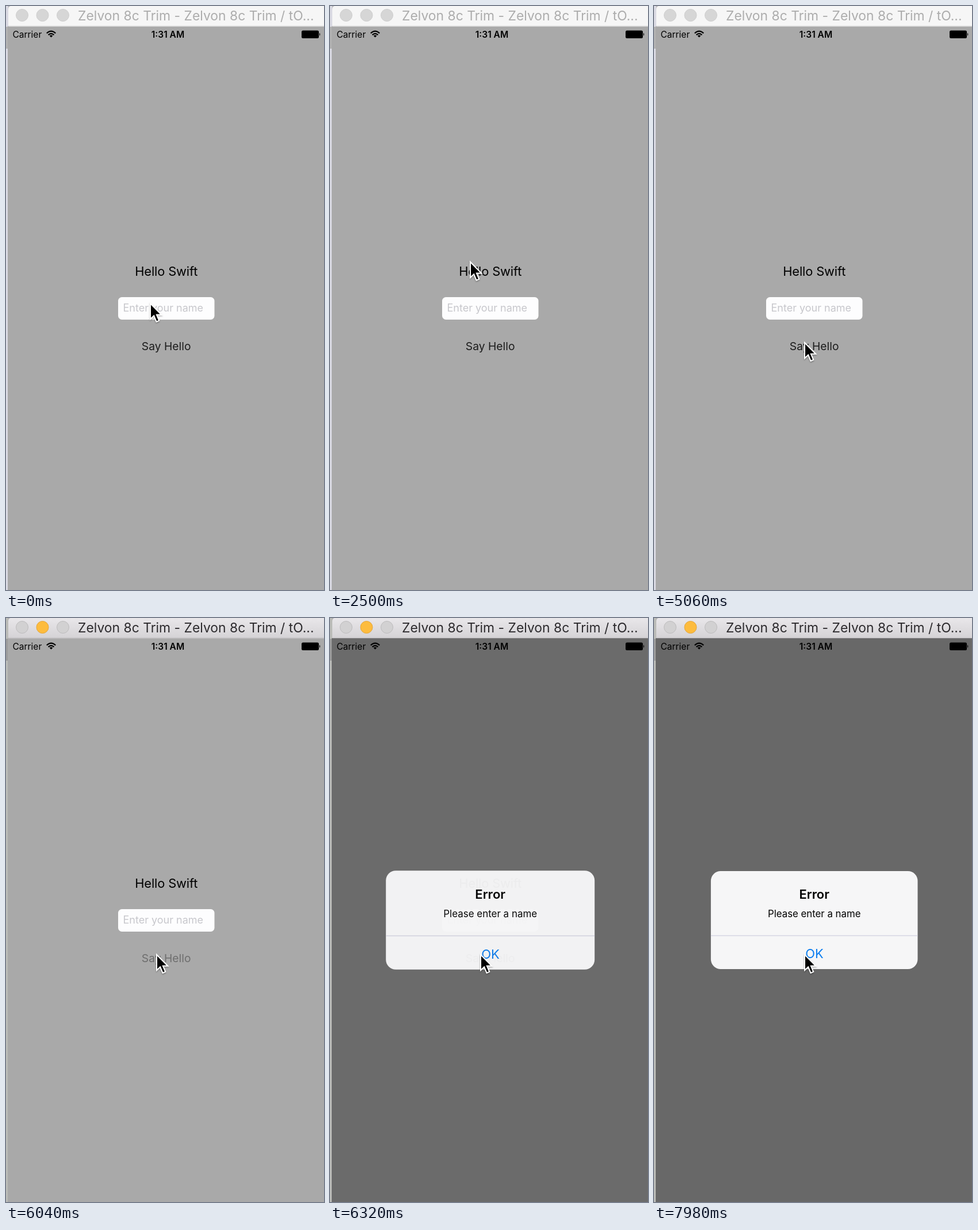
These frames come from a looping animation (553x1013 px, 8 s). An HTML page:

```html
<!DOCTYPE html>
<html lang="en">
<head>
<meta charset="utf-8">
<title>Alert demo</title>
<style>
  html, body { margin: 0; width: 100%; height: 100%; overflow: hidden; background: #aaa; }
  svg { display: block; width: 100vw; height: 100vh; }
  text { font-family: Inter, Roboto, sans-serif; white-space: pre; }
  .mid { text-anchor: middle; }
</style>
</head>
<body>
<svg viewBox="0 0 553 1013" preserveAspectRatio="none">
  <defs>
    <linearGradient id="barFill" x2="0" y2="1">
      <stop offset="0" stop-color="#e9e7ea"/>
      <stop offset="1" stop-color="#d4d2d5"/>
    </linearGradient>
    <filter id="shade" x="-50%" y="-50%" width="200%" height="200%">
      <feDropShadow dx="0" dy="1.5" stdDeviation="1.2" flood-opacity=".35"/>
    </filter>
  </defs>

  <!-- desktop edge and window -->
  <rect id="edge" width="4" height="1013"/>
  <rect id="edgeTop" y="36" width="4" height="38"/>
  <rect x="3" y="35" width="550" height="978" fill="#a9a9a9"/>
  <path id="bar" d="M4 35.500V6Q4 0 8 0H553V35.500Z"/>
  <rect id="barLine" x="4" y="34.500" width="549" height="1"/>
  <g id="lights" stroke-width="1">
    <circle cx="28" cy="16" r="10.500"/>
    <circle cx="63.500" cy="16" r="10.500"/>
    <circle cx="99" cy="16" r="10.500"/>
  </g>
  <text id="title" x="125" y="25" font-size="22.900">Zelvon 8c Trim - Zelvon 8c Trim / tO...</text>

  <!-- app screen -->
  <text class="mid" x="278.700" y="468" font-size="21.900" letter-spacing="-.15">Hello Swift</text>
  <rect x="195" y="505" width="167.500" height="39" rx="6.500" fill="#fdfdfe"/>
  <text x="203.500" y="530" font-size="18" fill="#c7c7cc">Enter your name</text>
  <text id="button" class="mid" x="278.700" y="596.500" font-size="19.300">Say Hello</text>
  <rect id="dim" x="3" y="35" width="550" height="978"/>

  <!-- status bar -->
  <text x="11.500" y="55" font-size="15.500">Carrier</text>
  <g fill="none" stroke="#000" stroke-width="2.200">
    <path d="M70.800 47.200Q78.500 40 86.200 47.200"/>
    <path d="M73.600 50.300Q78.500 45.600 83.400 50.300"/>
  </g>
  <path d="M78.500 54.600L75.700 51.700Q78.500 49.300 81.300 51.700Z"/>
  <text class="mid" x="281.500" y="55" font-size="15.500" font-weight="600">1:31 AM</text>
  <rect x="514" y="42.500" width="30" height="13.500" rx="2.500"/>
  <path d="M545 46.500Q547.500 49.200 545 52Z"/>

  <g id="alert">
    <rect id="panel" x="98.900" y="439" width="359.600" height="170" rx="17"/>
    <path d="M98.900 551H458.500" stroke="#c6c6da"/>
    <text class="mid" x="278.700" y="487" font-size="21.900" font-weight="600">Error</text>
    <text class="mid" x="278.700" y="519" font-size="16.800">Please enter a name</text>
    <text class="mid" x="279" y="590" font-size="21.900" fill="#0b7df0">OK</text>
  </g>

  <path id="cursor" d="M1 1V28L7.200 22.300L11.600 32.600L16.200 30.600L11.900 20.600H20.300Z"
        stroke="#fff" stroke-width="2" filter="url(#shade)"/>
</svg>
<script>
const LOOP = 8000, ACTIVATE = 5400, PRESS = 5920, ALERT = 6060;
const $ = id => document.getElementById(id);
const set = (id, attrs) => {
  for (const name in attrs) $(id).setAttribute(name, attrs[name]);
};
const clamp = v => Math.max(0, Math.min(1, v));
const ease = v => v * v * (3 - 2 * v);

// time, x, y of the pointer tip
const path = [
  [0, 250, 515], [820, 256, 612], [1020, 257, 631], [1560, 248, 490],
  [2400, 243, 443], [2560, 243, 443], [3240, 257, 570], [4180, 257, 570],
  [4900, 261, 583], [LOOP, 261, 583]
];

function pointer(t) {
  const i = path.findIndex(p => p[0] > t);
  const [t0, x0, y0] = path[i - 1], [t1, x1, y1] = path[i];
  const k = ease((t - t0) / (t1 - t0));
  return [x0 + (x1 - x0) * k, y0 + (y1 - y0) * k];
}

function drawWindow(active) {
  set('edge', { fill: active ? '#bbbcb8' : '#dadae3' });
  set('edgeTop', { fill: active ? '#9c9c9c' : '#b2b2b2' });
  set('bar', { fill: active ? 'url(#barFill)' : '#f6f6f6' });
  set('barLine', { fill: active ? '#b5b3b6' : '#d2d2d2' });
  set('lights', { fill: active ? '#d2d1d2' : '#d6d6d6', stroke: active ? '#bdbcbd' : '#cecece' });
  set('title', { fill: active ? '#2d2b2e' : '#adadad' });
  const minimise = $('lights').children[1];
  minimise.setAttribute('fill', active ? '#fdbc3e' : '#d6d6d6');
  minimise.setAttribute('stroke', active ? '#e3a53a' : '#cecece');
}

function draw(t) {
  drawWindow(t >= ACTIVATE);
  set('button', { fill: t >= PRESS && t < ALERT + 40 ? '#6e6e6e' : '#1c1c1c' });

  const shown = t < ALERT ? 0 : 1 - Math.exp((ALERT - t) / 90);
  const scale = 1 + 0.17 * (1 - shown);
  const tint = 250 - 4 * clamp((t - 6700) / 700);
  set('dim', { opacity: 0.39 * shown });
  set('alert', {
    opacity: shown,
    transform: `translate(278.7 524) scale(${scale}) translate(-278.7 -524)`
  });
  set('panel', { fill: `rgb(${tint},${tint},${tint + 1})` });
  set('cursor', { transform: `translate(${pointer(t)})` });
}

const start = performance.now();
function tick() {
  draw((performance.now() - start) % LOOP);
  requestAnimationFrame(tick);
}
tick();
</script>
</body>
</html>
```
